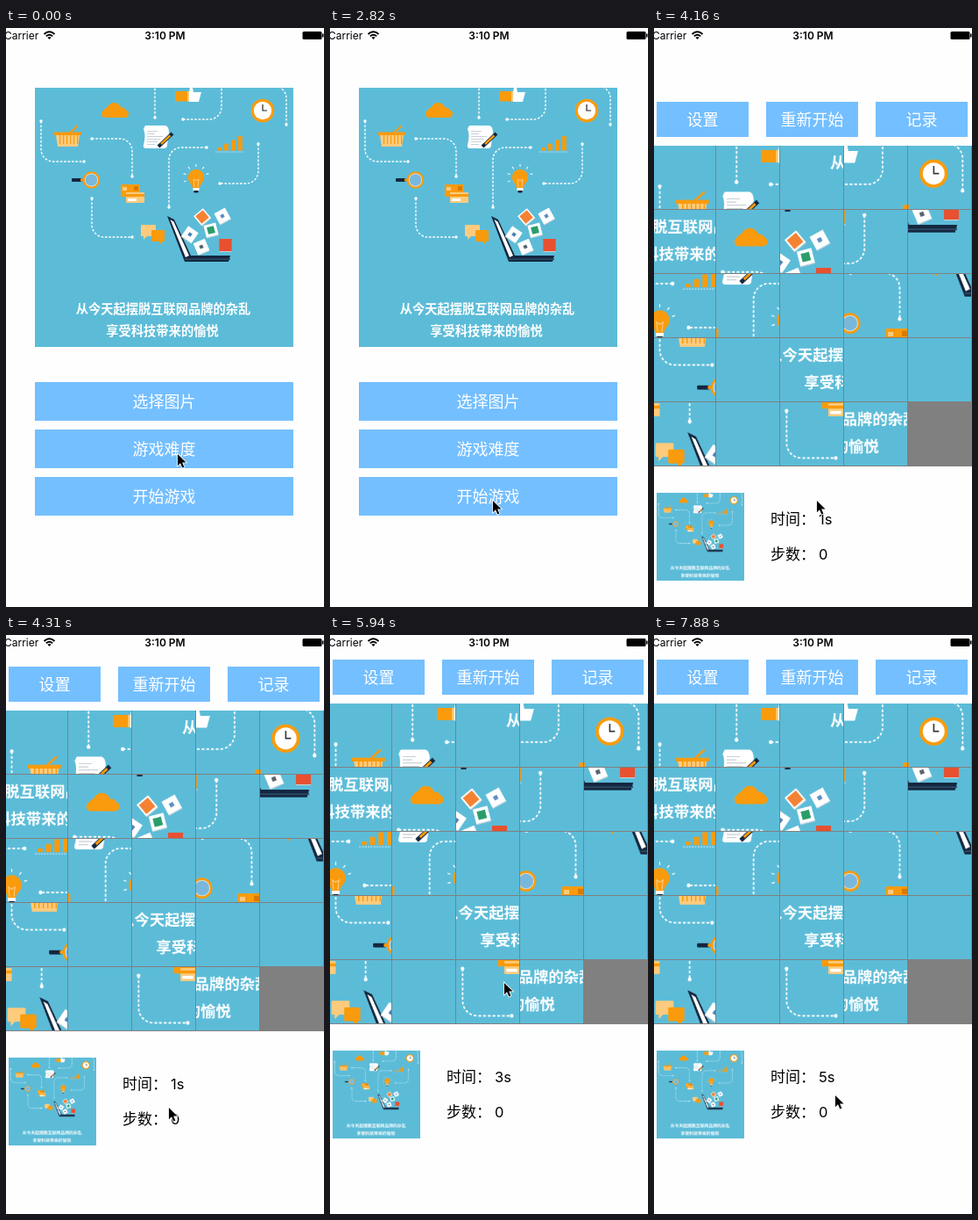
Write an HTML page with a canvas that moves like this. It is 363 px wide and 659 px high and loops after 8 s.

```html
<!DOCTYPE html>
<html lang="zh-CN">
<head>
<meta charset="utf-8">
<title>拼图游戏</title>
<style>
  html, body { margin: 0; width: 100%; height: 100%; overflow: hidden; background: #fefefe; }
  canvas { display: block; }
</style>
</head>
<body>
<canvas id="stage" width="363" height="659"></canvas>
<script>
const LOOP = 8000, TICK = 148.4;
const SIZE = 295, CELL = SIZE / 5, TILE = 73;
const ORANGE = '#f99b0c', PALE = '#fdcb7d', NAVY = '#14273f', SKY = '#5cbcd8';
const BUTTON = '#74bfff', PAGE = '#fefefe';
const CJK = '"Noto Sans CJK SC", "Noto Sans CJK", sans-serif';
const LATIN = 'Inter, sans-serif';
const stage = document.getElementById('stage').getContext('2d');

// Shuffled board: letter n of the alphabet is tile n of the solved picture.
const SHUFFLED = 'acudewbnjsihkgrfovpqmtlx';

// Where the pointer turns: tick, x, y.
const TURNS = [
  [2, 195, 483], [6, 180, 528], [12, 187, 528], [15, 187, 528], [17, 173, 485], [19, 185, 536],
  [32, 185, 536], [34, 162, 402], [36, 164, 318], [39, 180, 328], [41, 216, 460], [43, 200, 430],
  [46, 138, 516], [51, 232, 492], [53, 206, 522]
];

function pointerAt(tick) {
  const next = TURNS.findIndex(turn => turn[0] >= tick);
  const [t1, x1, y1] = TURNS[next];
  const [t0, x0, y0] = TURNS[Math.max(next - 1, 0)];
  const u = Math.max(0, (tick - t0) / (t1 - t0 || 1));
  const eased = u * u * (3 - 2 * u);
  return [x0 + (x1 - x0) * eased, y0 + (y1 - y0) * eased];
}
// The game page slides up from tick 27, losing 85 % of the rest on every tick.
const slideAt = tick => tick < 27 ? 659 : Math.round(371 * 0.15 ** (tick - 27));
const secondsAt = tick => 1 + Math.max(0, Math.floor((tick * TICK - 3740) / 1000));

function text(c, str, x, middle, size, color, { align = 'center', weight = 400, family = CJK } = {}) {
  c.font = `${weight} ${size}px ${family}`;
  c.textAlign = align;
  c.fillStyle = color;
  c.fillText(str, x, middle + size * 0.37);
}
function rect(c, color, x, y, w, h, radius = 0) {
  c.fillStyle = color;
  c.beginPath();
  c.roundRect(x, y, w, h, radius);
  c.fill();
}
function shape(c, color, d) {
  c.fillStyle = color;
  c.fill(new Path2D(d));
}
function line(c, color, width, d) {
  c.strokeStyle = color;
  c.lineWidth = width;
  c.stroke(new Path2D(d));
}
function disc(c, color, x, y, r) {
  c.fillStyle = color;
  c.beginPath();
  c.arc(x, y, r, 0, 7);
  c.fill();
}

// Dotted line with a rounded corner and a dot at both ends.
function trail(c, x0, y0, cornerX, cornerY, x1, y1) {
  c.strokeStyle = '#fff';
  c.lineWidth = 1.4;
  c.setLineDash([2.6, 1.8]);
  c.beginPath();
  c.moveTo(x0, y0);
  c.arcTo(cornerX, cornerY, x1, y1, 14);
  c.lineTo(x1, y1);
  c.stroke();
  c.setLineDash([]);
  disc(c, '#fff', x0, y0, 1.7);
  disc(c, '#fff', x1, y1, 1.7);
}
function drawTrails(c) {
  trail(c, 40, 106, 40, 152, 89, 152);
  trail(c, 98, 126, 144, 126, 144, 169);
  trail(c, 170, 102, 170, 80, 170, 60);
  trail(c, 202, 104, 246, 104, 246, 60);
  trail(c, 229, 136, 186, 136, 186, 204);
  trail(c, 288, 132, 288, 177, 244, 177);
  trail(c, 98, 194, 98, 238, 144, 238);
  trail(c, 320, 110, 320, 66, 300, 66);
}

function drawCloud(c) {
  rect(c, ORANGE, 109, 93.5, 31, 8.5, 4.2);
  disc(c, ORANGE, 116, 95, 4.5);
  disc(c, ORANGE, 123.5, 93, 8);
  disc(c, ORANGE, 132.5, 95.5, 5);
}
function drawBasket(c) {
  line(c, ORANGE, 2, 'M82 111L72 120');
  shape(c, PALE, 'M57 122H84L82 135H59Z');
  for (let x = 61; x < 83; x += 4) rect(c, ORANGE, x, 122, 1.2, 10);
  rect(c, ORANGE, 55, 118.5, 31, 3.5);
}
function drawCards(c) {
  rect(c, ORANGE, 131, 178, 22, 14, 1);
  rect(c, PALE, 133, 181, 5, 4);
  rect(c, '#d97a00', 146, 180, 5, 5);
  rect(c, PALE, 137, 187, 21, 12, 1);
  rect(c, ORANGE, 137, 189, 21, 3);
  rect(c, '#fff', 139, 194, 10, 3);
}
function drawThumb(c) {
  rect(c, ORANGE, 193, 72, 14, 11.5);
  rect(c, PALE, 207, 72, 2, 11.5);
  shape(c, '#fff', 'M209 73L210 68H213L214 73H223L220 84H209Z');
}
function drawClock(c) {
  disc(c, ORANGE, 293, 94, 13.3);
  disc(c, '#fff', 293, 94, 10.2);
  line(c, '#222', 1.2, 'M293 87V94H298');
}
function drawPaper(c) {
  shape(c, '#fff', 'M159 111H182Q186 112 186 119L184 133Q184 137 180 137H160Q156 137 157 133Q160 122 157 115Z');
  for (let y = 117; y < 134; y += 3) rect(c, '#c9d0d6', 161, y, 9 + y % 4 * 3, 1);
  line(c, NAVY, 4, 'M190 120L174 135');
  line(c, ORANGE, 2.4, 'M187.5 122.3L177 132');
}
function drawChart(c) {
  for (let i = 0; i < 4; i++) rect(c, ORANGE, 241 + 8 * i, 136 - 4.3 * i, 4.8, 3.5 + 4.3 * i);
  c.setLineDash([1.5, 1.2]);
  line(c, '#d9eef5', 0.8, 'M239 141H271');
  c.setLineDash([]);
}
function drawMagnifier(c) {
  rect(c, NAVY, 75, 171, 12, 4, 1);
  rect(c, ORANGE, 85, 171.5, 4, 3);
  disc(c, ORANGE, 97.5, 173, 9.7);
  disc(c, '#d8ebf5', 97.5, 173, 7.5);
  disc(c, '#78b8dc', 97.5, 173, 6.8);
}
function drawBulb(c) {
  shape(c, ORANGE, 'M213 182Q213 179 210 176A9.2 9.2 0 1 1 224 176Q221 179 221 182Z');
  line(c, PALE, 1, 'M215 181L214 172L217 174L220 172L219 181');
  rect(c, '#fff', 213.5, 182, 7, 3);
  rect(c, NAVY, 214.5, 185, 5, 2.5);
  for (let angle = -200; angle <= 20; angle += 36.7) {
    c.save();
    c.translate(217, 170);
    c.rotate(angle * Math.PI / 180);
    rect(c, '#fff', 12, -0.5, 3, 1);
    c.restore();
  }
}
function drawBubbles(c) {
  rect(c, PALE, 154, 224, 17, 13, 1);
  shape(c, PALE, 'M157 236V241L162 236Z');
  rect(c, ORANGE, 166, 230, 15, 13, 1);
  shape(c, ORANGE, 'M173 242L178 247V242Z');
}
function drawLaptop(c) {
  shape(c, NAVY, 'M184 214L192 218L211 259H256L254 266H204Z');
  shape(c, '#fff', 'M187.5 218L191.5 220.5L209 259L205 261Z');
  rect(c, '#2c4a66', 204, 262.5, 52, 1.5);
}
function drawBox(c, x, y, tilt, emblem, mark, box = '#fff') {
  c.save();
  c.translate(x, y);
  c.rotate(tilt);
  rect(c, '#c3d3da', -7, -6, 14, 14);
  rect(c, box, -7, -7, 14, 14);
  rect(c, emblem, -mark / 2, -mark / 2, mark, mark);
  c.restore();
}
function drawGoods(c) {
  drawBox(c, 224, 215, -0.7, '#f58232', 11);
  drawBox(c, 247, 214, -0.5, '#5b8fc4', 4);
  drawBox(c, 234, 230, -0.25, '#2a9d6a', 8);
  drawBox(c, 210, 235, 0.6, '#4c83b5', 4);
  drawBox(c, 223, 249, -0.4, '#59636e', 4);
  drawBox(c, 250.5, 247, 0, '#e8502f', 14, '#e8502f');
}

function drawPicture(c) {
  c.save();
  c.beginPath();
  c.rect(33, 68, SIZE, SIZE);
  c.clip();
  rect(c, SKY, 33, 68, SIZE, SIZE);
  const parts = [drawTrails, drawCloud, drawBasket, drawCards, drawThumb, drawClock, drawPaper,
    drawChart, drawMagnifier, drawBulb, drawBubbles, drawLaptop, drawGoods];
  for (const draw of parts) draw(c);
  text(c, '从今天起摆脱互联网品牌的杂乱', 179.5, 319.5, 14.25, '#fff', { weight: 700 });
  text(c, '享受科技带来的愉悦', 178.5, 345, 14.25, '#fff', { weight: 700 });
  c.restore();
}

const picture = document.createElement('canvas');
picture.width = picture.height = SIZE * 2;
const pictureContext = picture.getContext('2d');
pictureContext.scale(2, 2);
pictureContext.translate(-33, -68);
drawPicture(pictureContext);
stage.imageSmoothingQuality = 'high';

function button(label, x, y, w, h) {
  rect(stage, BUTTON, x, y, w, h);
  text(stage, label, x + w / 2, y + h / 2, 18, '#fff', { weight: 300 });
}

function drawMenu() {
  drawPicture(stage);
  ['选择图片', '游戏难度', '开始游戏'].forEach((label, i) => button(label, 33, 403 + 54 * i, 295, 44));
}

function drawBoard() {
  rect(stage, '#808080', 0, 78, 363, 365);
  [...SHUFFLED].forEach((letter, i) => {
    const tile = letter.charCodeAt(0) - 97, side = CELL * 2;
    stage.drawImage(picture, tile % 5 * side, Math.floor(tile / 5) * side, side, side,
      i % 5 * TILE - 2, 78 + Math.floor(i / 5) * TILE, TILE - 1, TILE - 1);
  });
}

function drawGame(offset, seconds) {
  stage.save();
  stage.translate(0, offset);
  rect(stage, PAGE, 0, 0, 363, 659);
  ['设置', '重新开始', '记录'].forEach((label, i) => button(label, 3 + 125 * i, 28, 105, 40));
  drawBoard();
  stage.drawImage(picture, 3, 473, 100, 100);
  [['时间：', seconds + 's'], ['步数：', '0']].forEach(([label, value], i) => {
    const y = 502.5 + 40 * i;
    text(stage, label, 133, y, 17, '#000', { align: 'left' });
    text(stage, value, 188, y + 0.5, 16.5, '#000', { align: 'left', family: LATIN });
  });
  stage.restore();
}

function drawStatusBar() {
  text(stage, 'Carrier', -2, 8.5, 12, '#000', { align: 'left', family: LATIN });
  text(stage, '3:10 PM', 181.5, 8.5, 12, '#000', { weight: 600, family: LATIN });
  line(stage, '#000', 1.9, 'M43.5 7Q49.5 1.5 55.5 7 M45.8 9.4Q49.5 6 53.2 9.4');
  shape(stage, '#000', 'M47.4 10.8Q49.5 9 51.6 10.8L49.5 13Z');
  rect(stage, '#000', 338.5, 4, 22, 9, 1.5);
  rect(stage, '#000', 361, 6.5, 1.5, 4);
}

function drawPointer(x, y) {
  const arrow = 'M0.5 0.5V15.5L4 12.3L6.6 18.3L9 17.2L6.4 11.4H11.4Z';
  stage.save();
  stage.translate(x + 0.5, y + 1.5);
  stage.scale(0.88, 0.88);
  line(stage, '#fff', 1.8, arrow);
  shape(stage, '#000', arrow);
  stage.restore();
}

const start = performance.now();
function frame() {
  const tick = Math.floor((performance.now() - start) % LOOP / TICK);
  const offset = slideAt(tick);
  rect(stage, PAGE, 0, 0, 363, 659);
  if (offset > 0) drawMenu();
  if (offset < 659) drawGame(offset, secondsAt(tick));
  drawStatusBar();
  drawPointer(...pointerAt(tick));
  requestAnimationFrame(frame);
}
frame();
</script>
</body>
</html>
```
